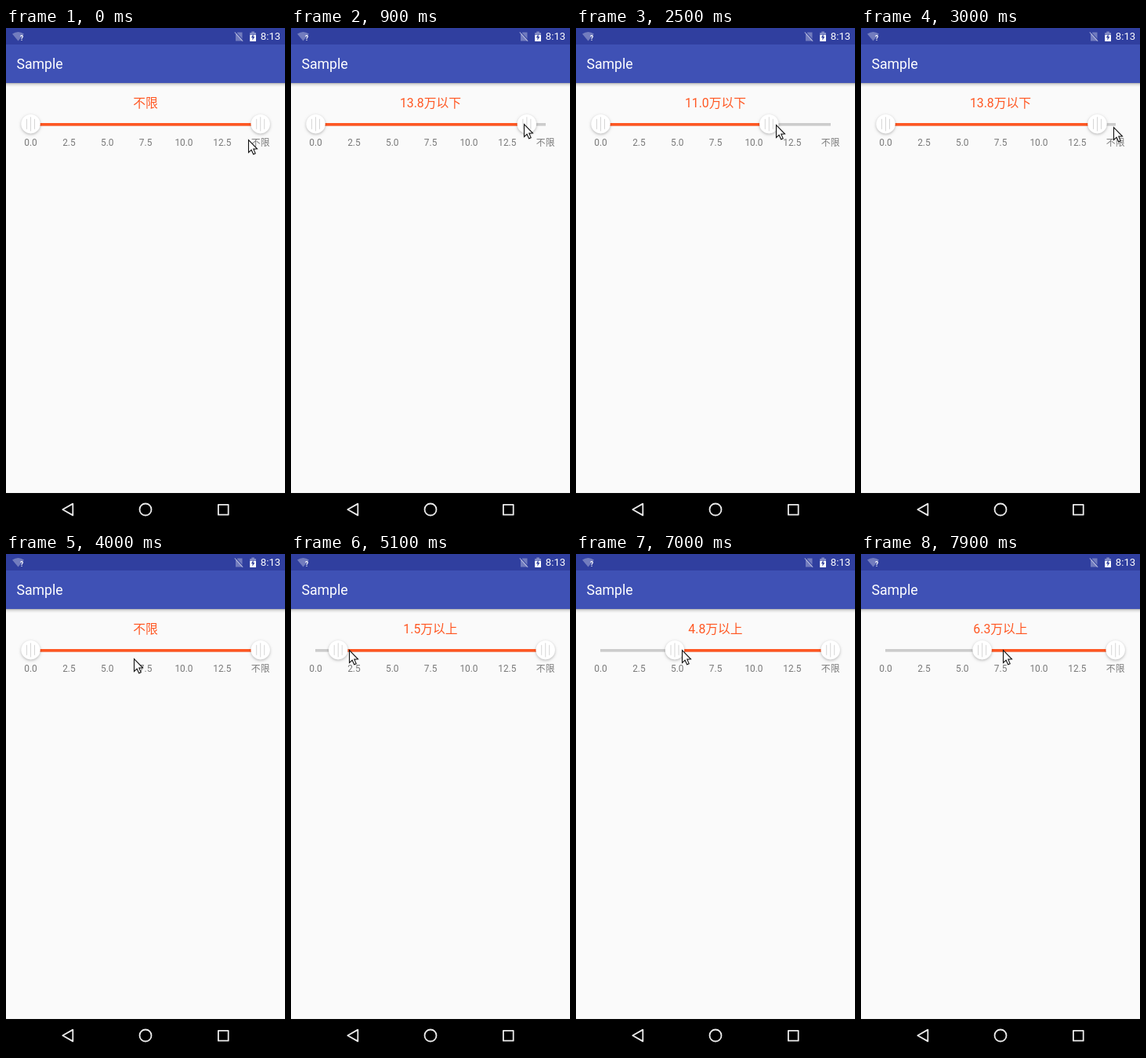
Write an HTML page with a canvas that moves like this. It is 356 by 634 pixels and loops after 8 s.

```html
<!DOCTYPE html>
<html lang="zh-CN">
<head>
<meta charset="utf-8">
<title>Range slider</title>
<style>
  html, body { margin: 0; width: 100%; height: 100%; overflow: hidden; background: #fafafa; }
  canvas { display: block; width: 356px; height: 634px; }
</style>
</head>
<body>
<canvas id="stage"></canvas>
<script>
const W = 356, H = 634, LOOP = 8000, STEP = 100;
const MIN_X = 31.5, MAX_X = 324.7, MAX_VALUE = 15, TRACK_Y = 122.8;
const ORANGE = '#ff5722';
const FONT = 'Roboto, "Noto Sans CJK SC", "Noto Sans CJK", sans-serif';

// time, pointer x, pointer y, low thumb x, high thumb x
const KEYS = [
  [0, 309, 142, MIN_X, MAX_X],
  [400, 320, 122, MIN_X, MAX_X],
  [600, 320, 122, MIN_X, MAX_X],
  [1100, 281, 122, MIN_X, 285],
  [1500, 240, 122, MIN_X, 244],
  [1600, 225, 122, MIN_X, 223.5],
  [2100, 225, 122, MIN_X, 223.5],
  [2600, 262, 123, MIN_X, 252],
  [3000, 322, 126, MIN_X, 301.5],
  [3100, 331, 126, MIN_X, 319],
  [3300, 340, 127, MIN_X, MAX_X],
  [3700, 340, 127, MIN_X, MAX_X],
  [3800, 305, 129, MIN_X, MAX_X],
  [4000, 163, 133, MIN_X, MAX_X],
  [4200, 82, 130, MIN_X, MAX_X],
  [4400, 43, 124, MIN_X, MAX_X],
  [4600, 31, 121, MIN_X, MAX_X],
  [5100, 74, 122, 60.2, MAX_X],
  [5500, 97, 122, 87, MAX_X],
  [6100, 113, 123, 106, MAX_X],
  [6400, 120, 123, 113, MAX_X],
  [6700, 129, 123, 122, MAX_X],
  [6800, 129, 123, 122, MAX_X],
  [7100, 138, 122, 128, MAX_X],
  [7300, 138, 122, 128, MAX_X],
  [7900, 181, 122, 154.6, MAX_X]
];

const canvas = document.getElementById('stage');
const ctx = canvas.getContext('2d');
const dpr = window.devicePixelRatio || 1;
canvas.width = W * dpr;
canvas.height = H * dpr;
ctx.scale(dpr, dpr);

function rect(x, y, w, h, color) {
  ctx.fillStyle = color;
  ctx.fillRect(x, y, w, h);
}

function text(str, x, y, size, color, align = 'center', weight = 400) {
  ctx.font = `${weight} ${size}px ${FONT}`;
  ctx.textAlign = align;
  ctx.fillStyle = color;
  ctx.fillText(str, x, y);
}

function poly(points) {
  ctx.beginPath();
  points.forEach(([x, y]) => ctx.lineTo(x, y));
  ctx.closePath();
}

function stateAt(time) {
  const t = Math.floor(time / STEP) * STEP;
  const i = KEYS.findIndex(k => k[0] > t);
  if (i < 0) return KEYS[KEYS.length - 1].slice(1);
  const a = KEYS[i - 1], b = KEYS[i];
  const p = (t - a[0]) / (b[0] - a[0]);
  return a.map((v, n) => v + (b[n] - v) * p).slice(1);
}

function valueOf(x) {
  return (x - MIN_X) / (MAX_X - MIN_X) * MAX_VALUE;
}

function caption(lo, hi) {
  if (hi < MAX_X) return valueOf(hi).toFixed(1) + '万以下';
  if (lo > MIN_X) return valueOf(lo).toFixed(1) + '万以上';
  return '不限';
}

function statusBar() {
  rect(0, 0, W, 21, '#303f9f');

  const dim = 'rgba(255,255,255,0.32)';
  ctx.fillStyle = dim;
  ctx.beginPath();
  ctx.moveTo(15.5, 16.5);
  ctx.lineTo(8, 7.5);
  ctx.quadraticCurveTo(15.5, 2.5, 23, 7.5);
  ctx.closePath();
  ctx.fill();
  text('?', 20, 16, 8.5, '#fff', 'center', 700);

  poly([[295.5, 5.5], [301.5, 5.5], [301.5, 16.5], [293, 16.5], [293, 8]]);
  ctx.fillStyle = dim;
  ctx.fill();
  ctx.lineWidth = 1.1;
  ctx.strokeStyle = '#303f9f';
  ctx.beginPath();
  ctx.moveTo(292.6, 4.6);
  ctx.lineTo(303, 16);
  ctx.stroke();
  ctx.strokeStyle = 'rgba(255,255,255,0.5)';
  ctx.beginPath();
  ctx.moveTo(291.8, 5.4);
  ctx.lineTo(302.2, 16.8);
  ctx.stroke();

  rect(313.3, 4.5, 3.6, 1.5, 'rgba(255,255,255,0.4)');
  rect(311.2, 6, 7.8, 3, 'rgba(255,255,255,0.4)');
  rect(311.2, 9, 7.8, 8, '#fff');
  poly([[315.8, 7.5], [312.8, 12.3], [314.6, 12.3], [314.4, 15.8], [317.4, 11], [315.6, 11]]);
  ctx.fillStyle = '#303f9f';
  ctx.fill();

  text('8:13', 324.8, 15.4, 13.2, '#fff', 'left');
}

function toolbar() {
  const shade = ctx.createLinearGradient(0, 70, 0, 75);
  shade.addColorStop(0, 'rgba(0,0,0,0.3)');
  shade.addColorStop(0.4, 'rgba(0,0,0,0.1)');
  shade.addColorStop(1, 'rgba(0,0,0,0)');
  rect(0, 70, W, 5, shade);
  rect(0, 21, W, 49, '#3f51b5');
  text('Sample', 13.4, 52, 17.7, '#fff', 'left');
}

function navBar() {
  rect(0, 592, W, 42, '#000');
  ctx.strokeStyle = '#ececec';
  ctx.lineWidth = 1.8;
  ctx.lineJoin = 'round';
  poly([[72.3, 613], [85.3, 605.6], [85.3, 620.4]]);
  ctx.stroke();
  ctx.beginPath();
  ctx.arc(178, 613, 7.5, 0, Math.PI * 2);
  ctx.stroke();
  ctx.strokeRect(270.9, 606.9, 12.8, 12.8);
}

function thumb(x) {
  ctx.save();
  ctx.shadowColor = 'rgba(0,0,0,0.27)';
  ctx.shadowBlur = 3.5 * dpr;
  ctx.shadowOffsetY = 1.2 * dpr;
  ctx.fillStyle = '#fff';
  ctx.beginPath();
  ctx.arc(x, 122.2, 12.2, 0, Math.PI * 2);
  ctx.fill();
  ctx.restore();
  for (const n of [-1, 0, 1]) {
    const h = n ? 13 : 18;
    rect(x + n * 5 - 0.5, 122.3 - h / 2, 1, h, '#d6d6d6');
  }
}

function slider(lo, hi) {
  text(caption(lo, hi), 178, 100.8, 15.8, ORANGE);
  for (let i = 0; i < 7; i++) {
    const label = i < 6 ? (i * 2.5).toFixed(1) : '不限';
    text(label, MIN_X + (MAX_X - MIN_X) * i / 6, 149.6, 11.87, '#7a7a7a');
  }
  const top = TRACK_Y - 1.8;
  rect(MIN_X - 0.5, top, MAX_X - MIN_X + 0.8, 3.6, '#cccccc');
  rect(lo, top, hi - lo, 3.6, ORANGE);
  thumb(lo);
  thumb(hi);
}

function pointer(x, y) {
  ctx.save();
  ctx.translate(Math.round(x) + 0.5, Math.round(y) + 0.5);
  poly([[0, 0], [0, 16], [3.6, 12.7], [6.2, 18.2], [8.7, 17.1], [6.3, 11.6], [11, 11.3]]);
  ctx.fillStyle = '#fff';
  ctx.fill();
  ctx.lineWidth = 1.1;
  ctx.lineJoin = 'miter';
  ctx.strokeStyle = '#111';
  ctx.stroke();
  ctx.restore();
}

function draw() {
  const [px, py, lo, hi] = stateAt(performance.now() % LOOP);
  rect(0, 0, W, H, '#fafafa');
  toolbar();
  statusBar();
  navBar();
  slider(lo, hi);
  pointer(px, py);
  requestAnimationFrame(draw);
}

draw();
</script>
</body>
</html>
```
